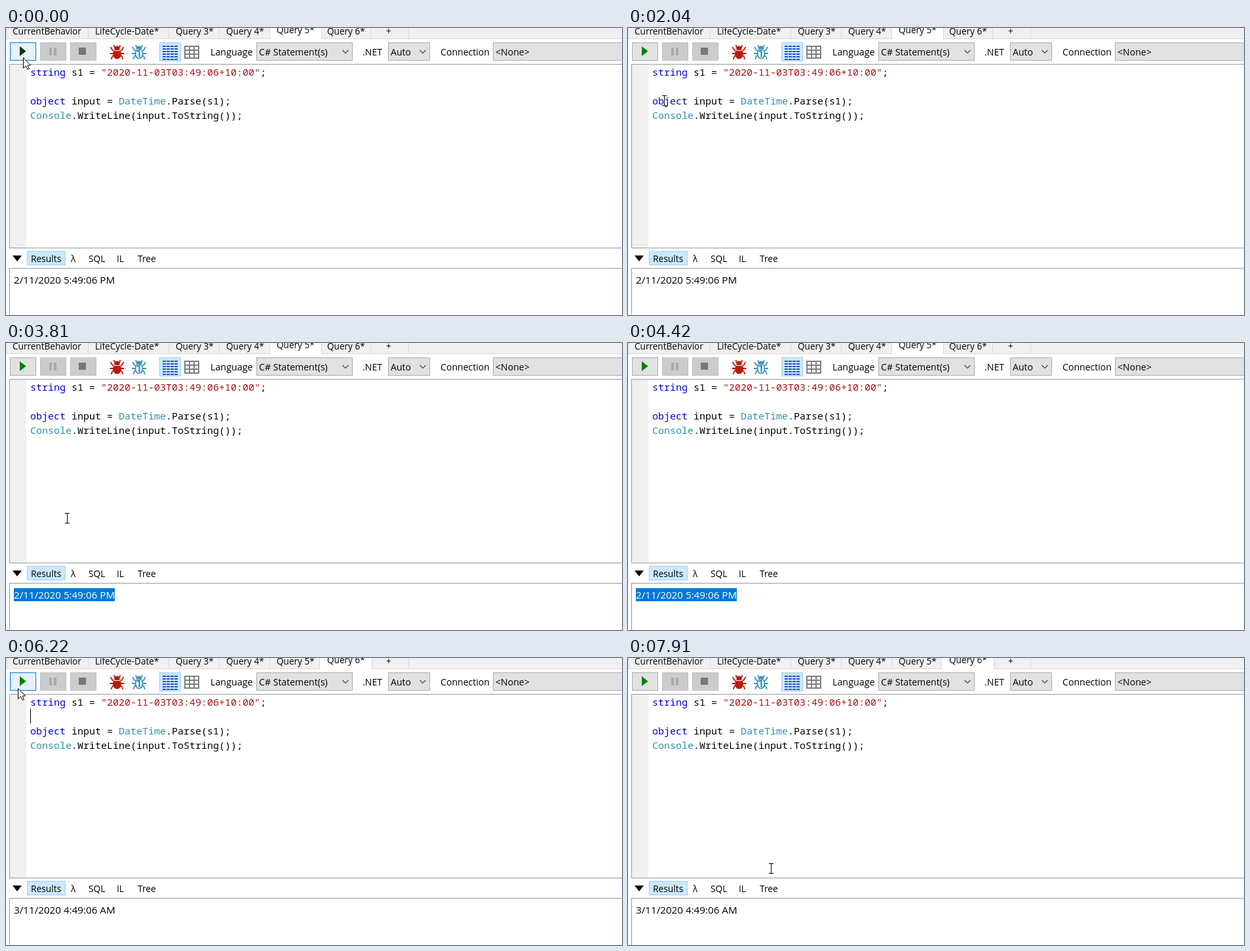
Write an HTML page with a canvas that moves like this. It is 940x439 px and loops after 7990 ms.

```html
<!DOCTYPE html>
<html lang="en">
<head>
<meta charset="utf-8">
<title>Query editor</title>
<style>
html, body { margin: 0; height: 100%; overflow: hidden; background: #fff; }
canvas { display: block; }
</style>
</head>
<body>
<canvas id="stage" width="940" height="439"></canvas>
<script>
const ctx = document.getElementById('stage').getContext('2d');
const LOOP = 7990;
const UI = '"Open Sans", "Noto Sans", sans-serif';
const MONO = '"Noto Sans Mono", "DejaVu Sans Mono", monospace';
const KEYWORD = '#0000e0', TYPE = '#2b91af', STRING = '#a31515', INK = '#000';

const CODE = [
  [73, ['string', KEYWORD], [' s1 = ', INK], ['"2020-11-03T03:49:06+10:00"', STRING], [';', INK]],
  [117, ['object', KEYWORD], [' input = ', INK], ['DateTime', TYPE], ['.Parse(s1);', INK]],
  [139, ['Console', TYPE], ['.WriteLine(input.ToString());', INK]],
];
const TABS = [
  ['CurrentBehavior', 10, 0], ['LifeCycle-Date*', 136, 125], ['Query 3*', 259, 248],
  ['Query 4*', 336, 325], ['Query 5*', 413, 402], ['Query 6*', 490, 481], ['+', 580, 556],
];
// Pointer moves: start, end, number of steps, waypoints
const MOVES = [
  [0, 0, 1, [26, 45]],
  [380, 530, 3, [26, 44], [26, 42]],
  [1950, 2560, 9, [34, 60], [75, 160], [140, 290], [190, 402], [208, 392]],
  [2710, 3190, 7, [212, 381], [150, 383], [60, 388], [-4, 393]],
  [3430, 3430, 1, [-40, 393]],
  [3810, 4420, 9, [93, 267], [66, 205], [120, 125], [250, 62], [345, 20], [400, -25]],
  [4900, 5130, 4, [500, -6], [526, 7]],
  [5910, 5970, 2, [270, 30], [36, 49]],
  [6220, 6290, 2, [18, 46], [15, 45]],
  [7760, 7910, 3, [60, 110], [218, 321]],
];
const CLICKS = [[1070, 1240], [2710, 3430], [5360, 5510], [7150, 7300]];
const TOP_CARET = [[210, 760], [1310, 1790], [2340, 2710]];
const BLANK_CARET = [[5910, 6450], [6990, 7470]];
const RUNS = [[1240, 1390], [7300, 7470]];
const HOVERS = [[0, 1390], [6220, 7470]];
const TIPS = [[380, 1070, 26], [6830, 7150, 15]];

const within = (t, spans) => spans.some(([a, b]) => t >= a && t < b);

function rect(x, y, w, h, fill, border) {
  ctx.fillStyle = border || fill;
  ctx.fillRect(x, y, w, h);
  if (border) {
    ctx.fillStyle = fill;
    ctx.fillRect(x + 1, y + 1, w - 2, h - 2);
  }
}

function text(str, x, y, size = 14.1, color = INK, family = UI) {
  ctx.font = `${size}px ${family}`;
  ctx.fillStyle = color;
  ctx.fillText(str, x, y);
}

function shape(points, fill, stroke) {
  ctx.beginPath();
  points.forEach(([x, y]) => ctx.lineTo(x, y));
  ctx.closePath();
  ctx.fillStyle = fill;
  ctx.fill();
  if (stroke) {
    ctx.strokeStyle = stroke;
    ctx.lineWidth = 1;
    ctx.stroke();
  }
}

function lines(color, width, ...paths) {
  ctx.strokeStyle = color;
  ctx.lineWidth = width;
  ctx.beginPath();
  for (const path of paths) path.forEach(([x, y], i) => i ? ctx.lineTo(x, y) : ctx.moveTo(x, y));
  ctx.stroke();
}

function pointer(t) {
  const [start, end, steps, ...points] = MOVES.findLast(m => m[0] <= t);
  if (steps === 1) return points[0];
  const step = Math.min(steps - 1, Math.floor((t - start) / (end - start) * (steps - 1)));
  const pos = step / (steps - 1) * (points.length - 1);
  const i = Math.min(points.length - 2, Math.floor(pos));
  return points[i].map((v, axis) => v + (points[i + 1][axis] - v) * (pos - i));
}

function drawTabs(t) {
  const active = t < 5360 ? 4 : 5;
  rect(0, 0, 940, 17, '#f0f0f0');
  rect(0, 16, 940, 1, '#d9d9d9');
  if (t >= 4900 && t < 5360) rect(482, 0, 74, 16, '#d8eaf9');
  for (const [, , x] of TABS) rect(x, 0, 1, 16, '#d9d9d9');
  rect(614, 0, 1, 16, '#d9d9d9');
  const [left, right] = active === 4 ? [402, 481] : [478, 558];
  rect(left, 0, right - left, 17, '#fff');
  rect(left, 0, 1, 17, '#d9d9d9');
  rect(right, 0, 1, 17, '#d9d9d9');
  TABS.forEach(([name, x], i) => text(name, x, i === active ? 8 : 10, 13.6));
}

function drawBug(x, color, numbered) {
  const legs = [];
  for (const side of [-1, 1]) {
    legs.push([[x + side * 3, 31], [x + side * 5, 26]]);
    legs.push([[x, 36], [x + side * 7, 34], [x + side * 10, 29]]);
    legs.push([[x, 39], [x + side * 11, 39]]);
    legs.push([[x, 41], [x + side * 7, 43], [x + side * 9, 48]]);
  }
  lines(color, 1.8, ...legs);
  ctx.fillStyle = color;
  ctx.beginPath();
  ctx.ellipse(x, 39.5, 6.5, 8, 0, 0, 7);
  ctx.ellipse(x, 31, 4, 3.5, 0, 0, 7);
  ctx.fill();
  if (numbered) {
    ctx.beginPath();
    ctx.ellipse(x, 39, 4.5, 7, 0, 0, 7);
    ctx.fillStyle = '#fff';
    ctx.fill();
    lines(color, 2.4, [[x - 3, 36], [x + .5, 33.5], [x + .5, 45]]);
  } else {
    lines('#fff', 1, [[x - 5, 34.5], [x + 5, 34.5]]);
  }
}

function dropdown(x, w, label) {
  rect(x, 22, w, 28, '#e1e1e1', '#adadad');
  text(label, x + 4, 42);
  const c = x + w - 11;
  lines('#5a3a4a', 1.2, [[c - 4.5, 34], [c, 38.5], [c + 4.5, 34]]);
}

function drawToolbar(t) {
  const running = within(t, RUNS);
  const pressed = within(t, [CLICKS[0], CLICKS[3]]);
  const [fill, border] = pressed ? ['#cce4f7', '#005499']
    : within(t, HOVERS) ? ['#e5f1fb', '#0078d7'] : ['#e1e1e1', '#adadad'];
  rect(6, 22, 40, 28, fill, border);
  shape([[21, 28], [30.5, 35.5], [21, 43]], running ? '#808080' : t < 1070 ? '#073807' : '#008000');

  const side = running ? ['#e1e1e1', '#adadad'] : ['#ccc', '#bfbfbf'];
  rect(52, 22, 40, 28, ...side);
  for (const x of [66, 73]) rect(x, 30, 4, 12, running ? '#ffa500' : '#aaa');
  rect(98, 22, 40, 28, ...side);
  rect(111, 30, 11, 11, running ? '#f00' : '#777');

  drawBug(169.5, '#b91c0c');
  drawBug(203, '#3a93bd', true);

  rect(234, 22, 33, 29, '#cce8ff', '#99d1ff');
  for (let row = 0; row < 6; row++)
    for (let col = 0; col < 4; col++) rect(239 + col * 6, 27 + row * 4, 5, 2, '#2754b8');
  rect(272, 27, 23, 20, '#808080');
  for (let row = 0; row < 3; row++)
    for (let col = 0; col < 3; col++) rect(274 + col * 7, 29 + row * 6, 5, 4, '#fff');

  text('Language', 312, 42, 14.3);
  dropdown(382, 147, 'C# Statement(s)');
  text('.NET', 544, 42);
  dropdown(583, 64, 'Auto');
  text('Connection', 663, 42);
  dropdown(743, 240, '<None>');
}

function drawEditor(t) {
  rect(5, 55, 950, 282, '#fff', '#999');
  rect(6, 56, 25, 280, '#f0f0f0');
  for (const [y, ...parts] of CODE) {
    let x = 37;
    for (const [str, color] of parts) {
      text(str, x, y, 15, color, MONO);
      x += str.length * 9;
    }
  }
  if (within(t, TOP_CARET)) rect(397, 56, 1, 22, INK);
  if (within(t, BLANK_CARET)) rect(37, 78, 1, 22, INK);
}

function drawResults(t, pointerX) {
  shape([[10, 348], [24, 348], [17, 357]], INK);
  rect(32, 341, 59, 22, '#cce8ff', '#99d1ff');
  [['Results', 38], ['λ', 99], ['SQL', 126], ['IL', 169], ['Tree', 201]]
    .forEach(([name, x]) => text(name, x, 358, 13.8));

  rect(5, 367, 950, 90, '#fff', '#999');
  if (within(t, RUNS)) return;
  const output = t < 5440 ? '2/11/2020 5:49:06 PM' : '3/11/2020 4:49:06 AM';
  text(output, 12, 391, 15.2);
  if (t < 2710 || t >= 5440) return;

  const edge = n => 12 + ctx.measureText(output.slice(0, n)).width;
  const reach = t < 3190 ? pointerX : 0;
  let first = 0;
  while (first < output.length && edge(first) < reach) first++;
  const from = edge(first), width = edge(output.length) - from;
  ctx.save();
  ctx.beginPath();
  ctx.rect(from, 375, width, 20);
  ctx.clip();
  rect(from, 375, width, 20, '#0078d7');
  text(output, 12, 391, 15.2, '#fff');
  ctx.restore();
}

function drawTooltip(t) {
  const tip = TIPS.find(([a, b]) => t >= a && t < b);
  if (!tip) return;
  const [start, , x] = tip;
  ctx.save();
  ctx.globalAlpha = Math.min(1, (Math.floor((t - start) / 75) + 1) / 3);
  ctx.shadowColor = 'rgba(0,0,0,.45)';
  ctx.shadowBlur = 3;
  ctx.shadowOffsetX = ctx.shadowOffsetY = 2;
  rect(x, 62, 153, 26, '#767676');
  ctx.shadowColor = 'transparent';
  rect(x + 1, 63, 151, 24, '#fff');
  text('Execute (F5 or Alt+X)', x + 7, 80, 14.5, '#575757');
  ctx.restore();
}

function drawPointer(t, [x, y]) {
  if (within(t, CLICKS)) {
    ctx.save();
    ctx.globalCompositeOperation = 'multiply';
    ctx.fillStyle = '#fff04c';
    ctx.beginPath();
    ctx.arc(x, y, 15, 0, 7);
    ctx.fill();
    ctx.restore();
  }
  x = Math.round(x) + .5;
  y = Math.round(y) + .5;
  const overCode = x > 31 && y > 56 && y < 336;
  const selecting = t > 2710 && t < 3430 && x < 170;
  if (overCode || selecting) {
    lines(INK, 1, [[x - 3.5, y - 7], [x + 3.5, y - 7]], [[x, y - 7], [x, y + 8]], [[x - 3.5, y + 8], [x + 3.5, y + 8]]);
  } else {
    shape([[0, 0], [0, 16], [4, 12.5], [6.5, 18], [9, 17], [6.5, 11.5], [11, 11.5]]
      .map(([dx, dy]) => [x + dx, y + dy]), '#fff', INK);
  }
}

function draw() {
  const t = performance.now() % LOOP;
  const at = pointer(t);
  rect(0, 0, 940, 439, '#fff');
  drawTabs(t);
  drawToolbar(t);
  drawEditor(t);
  drawResults(t, at[0]);
  drawTooltip(t);
  drawPointer(t, at);
  requestAnimationFrame(draw);
}
draw();
</script>
</body>
</html>
```
